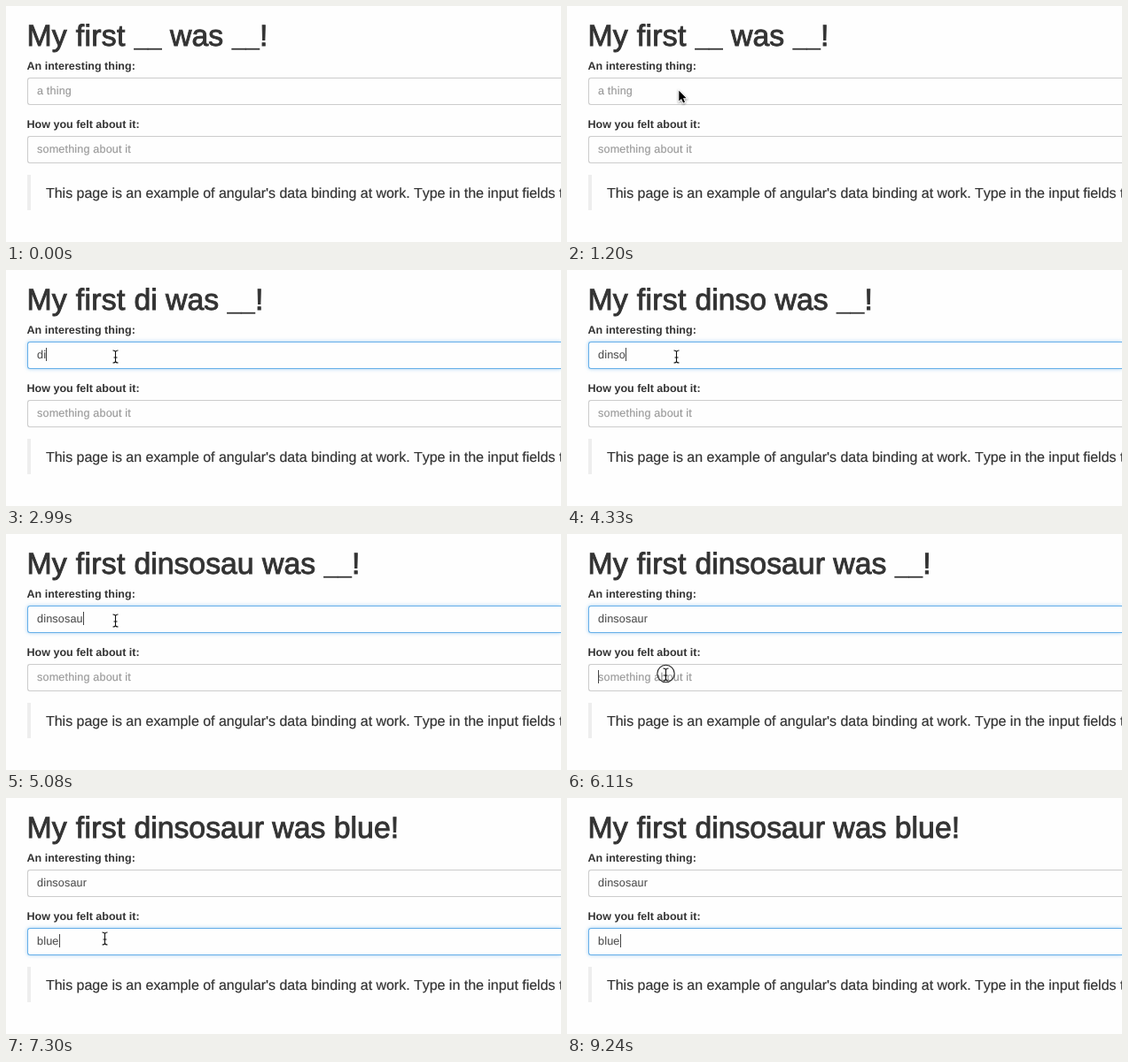
Recreate the animation shown at these times as an HTML page. Size 626 by 267 pixels, loop 9340 ms.

```html
<!DOCTYPE html>
<html lang="en">
<head>
<meta charset="utf-8">
<title>Data binding</title>
<style>
  html, body { margin: 0; width: 100%; height: 100%; overflow: hidden; background: #fefefe; }
  .field {
    position: absolute; left: 24px; right: 0; height: 31px; box-sizing: border-box;
    border: 1px solid #ccc; border-right: 0; border-radius: 3px 0 0 3px;
  }
  .field.focus { border-color: #66afe9; box-shadow: 0 0 4px rgba(102,175,233,.6); }
  svg { position: absolute; left: 0; top: 0; overflow: hidden; }
  text {
    font-family: "Liberation Sans", Arial, sans-serif; fill: #333; white-space: pre;
    font-kerning: none; font-variant-ligatures: none; text-rendering: geometricPrecision;
  }
  #head { font-size: 33.8px; stroke: #333; stroke-width: .9px; }
  .label { font-size: 12.5px; font-weight: bold; }
  .value { font-size: 12.6px; letter-spacing: .17px; fill: #555; stroke: #555; stroke-width: .15px; }
  .value.empty { fill: #999; stroke: #999; }
  .quote { font-size: 15.95px; stroke: #333; stroke-width: .2px; }
  #arrow { filter: drop-shadow(0 1px 1px rgba(0,0,0,.45)); }
</style>
</head>
<body>
<div class="field" style="top:81px"></div>
<div class="field" style="top:147px"></div>
<svg width="626" height="267">
  <text id="head" x="23.4" y="45"></text>
  <text class="label" x="23.6" y="72">An interesting thing:</text>
  <text class="value" x="35" y="100"></text>
  <text class="label" x="23.6" y="138">How you felt about it:</text>
  <text class="value" x="35" y="166"></text>
  <rect x="24" y="191" width="4" height="40" fill="#eee"/>
  <text class="quote" x="45" y="217">This page is an example of angular's data binding at work. Type in the input fields t</text>
  <rect id="caret" width="1" height="15" fill="#444"/>
  <g id="mouse">
    <path id="arrow" d="M.3 .8V12.4L3 10L5.1 14.6L7 13.8L5 9.3H8.6Z" stroke="#fff" stroke-width="1.8" paint-order="stroke"/>
    <path id="beam" d="M-3 -7Q0 -7 0 -5Q0 -7 3 -7M0 -5V5M-3 7Q0 7 0 5Q0 7 3 7M-2 1H2" fill="none" stroke="#111" stroke-width="1.1"/>
    <circle id="ring" r="9.7" cy="-1" fill="none" stroke="#222" stroke-width="1.1"/>
  </g>
</svg>
<script>
const LOOP = 9340;
const $ = id => document.getElementById(id);
const boxes = document.querySelectorAll('.field');
const values = document.querySelectorAll('.value');

const inputs = [
  { word: 'dinsosaur', hint: 'a thing', keys: [2840, 2990, 3130, 3280, 3430, 4780, 4930, 5080, 5230] },
  { word: 'blue', hint: 'something about it', keys: [6710, 7010, 7150, 7300] }
];
const blinks = [1800, 2390, 2840, 3880, 4330, 5660, 6110, 7750, 8190, 8780, 9240];
const clicks = [[1800, 1950], [6110, 6260]];

// time, pointer kind, x, y
const moves = [
  [0, ''],
  [300, 'arrow', 148, 7], [600, 'arrow', 144, 28], [750, 'arrow', 128, 58],
  [900, 'arrow', 118, 78], [1050, 'arrow', 121, 90], [1200, 'arrow', 126, 95],
  [1650, 'beam', 123.5, 98],
  [5520, 'beam', 122, 104], [5660, 'arrow', 116, 124], [5810, 'beam', 112, 152],
  [5960, 'beam', 111.5, 159],
  [7750, 'beam', 140, 165], [7900, 'arrow', 192, 179], [8050, 'arrow', 238, 190],
  [8190, '']
];

const passed = (times, t) => times.filter(x => x <= t).length;
const show = (el, on) => el.setAttribute('visibility', on ? 'visible' : 'hidden');
const slot = word => word ||
  '<tspan font-size="28.2" dy="-1.5" stroke="none">__</tspan><tspan dy="1.5">\u200b</tspan>';

function draw(t) {
  const typed = inputs.map(f => f.word.slice(0, passed(f.keys, t)));
  $('head').innerHTML =
    `<tspan letter-spacing=".3">My first </tspan>${slot(typed[0])} was ${slot(typed[1])}!`;

  const focus = t < 1950 ? -1 : t < 6260 ? 0 : 1;
  inputs.forEach((f, i) => {
    values[i].textContent = typed[i] || f.hint;
    values[i].classList.toggle('empty', !typed[i]);
    boxes[i].classList.toggle('focus', i === focus);
  });

  const active = t < 6110 ? 0 : 1;
  const width = typed[active] ? values[active].getComputedTextLength() : 0;
  $('caret').setAttribute('x', Math.round(35 + width));
  $('caret').setAttribute('y', active ? 154 : 88);
  show($('caret'), passed(blinks, t) % 2);

  const [, kind, x = 0, y = 0] = moves.filter(m => m[0] <= t).pop();
  $('mouse').setAttribute('transform', `translate(${x} ${y})`);
  show($('arrow'), kind === 'arrow');
  show($('beam'), kind === 'beam');
  show($('ring'), clicks.some(([from, to]) => t >= from && t < to));
}

const start = performance.now();
function tick() {
  draw((performance.now() - start) % LOOP);
  requestAnimationFrame(tick);
}
tick();
</script>
</body>
</html>
```
